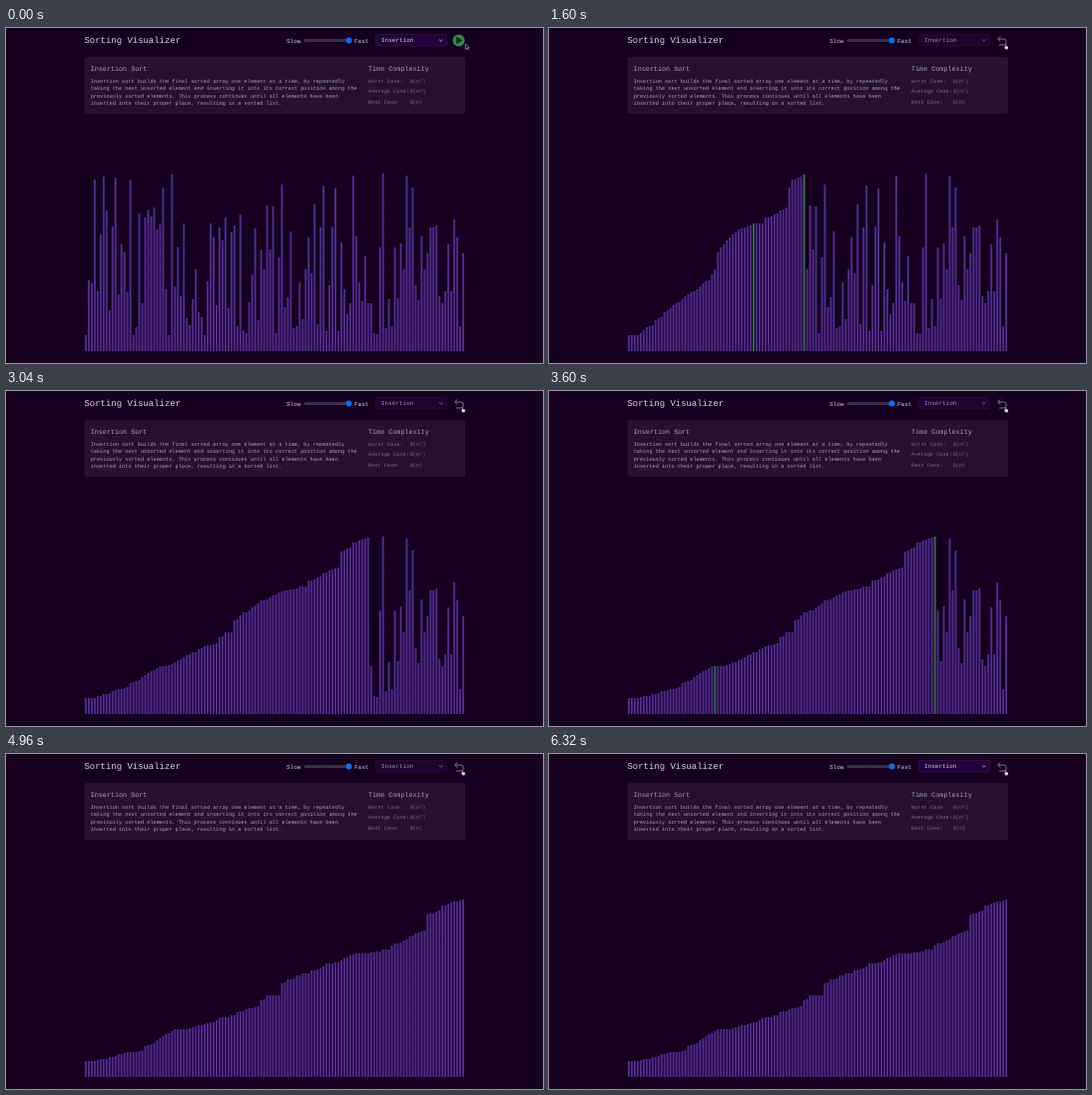
These frames come from a looping animation (538x336 px, 6400 ms). An HTML page with a canvas:

```html
<!DOCTYPE html>
<html lang="en">
<head>
<meta charset="utf-8">
<title>Sorting Visualizer</title>
<style>
html, body { margin: 0; width: 100%; height: 100%; overflow: hidden; background: #150020; }
canvas { display: block; width: 538px; height: 336px; }
</style>
</head>
<body>
<canvas id="stage" width="538" height="336"></canvas>
<script>
const ctx = document.getElementById('stage').getContext('2d');
const LOOP = 6400, TICK = 80;
const START = 560, SORTED = 4890, SWEEP = 4960, SWEEP_STEP = 4.5, FADE = 120, RESET = 6000;
const BASE = 324, LEFT = 79, PITCH = 2.977, BAR = 1.95;
const PURPLE = [80, 43, 143], GREEN = [54, 108, 74];

// Top edge of each bar before sorting.
const TOPS = [
  308, 253, 256, 152, 264, 207, 149, 183, 283, 199, 150, 267, 217, 225, 265, 152,
  308, 300, 186, 276, 190, 182, 189, 180, 202, 196, 160, 262, 308, 147, 259, 220,
  269, 196, 291, 298, 272, 242, 285, 290, 308, 254, 196, 210, 278, 200, 213, 190,
  281, 205, 198, 299, 187, 303, 306, 275, 247, 201, 293, 222, 242, 178, 222, 179,
  306, 230, 157, 280, 270, 204, 301, 299, 255, 292, 242, 210, 246, 177, 297, 200,
  158, 304, 258, 199, 161, 304, 215, 262, 287, 276, 148, 209, 255, 274, 229, 276,
  276, 306, 307, 220, 146, 301, 272, 299, 220, 271, 216, 242, 148, 200, 160, 258,
  273, 209, 242, 226, 200, 200, 198, 269, 276, 264, 217, 264, 192, 210, 299, 226
];

// Runs insertion sort for a number of steps; each shift is one step.
function insertionSort(limit) {
  const bars = TOPS.slice(), starts = [];
  let steps = 0;
  for (let i = 1; i < bars.length; i++) {
    const key = bars[i];
    let j = i;
    starts[i] = steps;
    while (j > 0 && bars[j - 1] < key) {
      if (steps >= limit) return { bars, active: j < i ? [i, j] : [] };
      bars[j] = bars[j - 1];
      j--;
      steps++;
    }
    bars[j] = key;
  }
  return { bars, active: [], starts, steps };
}

const full = insertionSort(Infinity);
const PACE = [
  [START, 0],
  [960, full.starts[37] + 16],
  [2240, full.starts[76] + 29],
  [3040, full.starts[96]],
  [4240, full.starts[118]],
  [SORTED, full.steps]
];

function stepsAt(t) {
  if (t <= START) return 0;
  for (let k = 1; k < PACE.length; k++) {
    const [t0, s0] = PACE[k - 1], [t1, s1] = PACE[k];
    if (t <= t1) return Math.round(s0 + (s1 - s0) * (t - t0) / (t1 - t0));
  }
  return full.steps;
}

const clamp = v => Math.max(0, Math.min(1, v));
const mix = (a, b, k) => `rgb(${a.map((v, i) => Math.round(v + (b[i] - v) * k))})`;

function text(str, x, y, size, color) {
  ctx.font = `${size}px "Liberation Mono", monospace`;
  ctx.fillStyle = color;
  ctx.fillText(str, x, y);
}

function box(x, y, w, h, r, fill, stroke) {
  ctx.beginPath();
  ctx.roundRect(x, y, w, h, r);
  ctx.fillStyle = fill;
  ctx.fill();
  if (stroke) {
    ctx.strokeStyle = stroke;
    ctx.lineWidth = 0.7;
    ctx.stroke();
  }
}

function disc(x, y, r, color) {
  ctx.beginPath();
  ctx.arc(x, y, r, 0, Math.PI * 2);
  ctx.fillStyle = color;
  ctx.fill();
}

function shape(points, fill, stroke, width = 0.6) {
  ctx.beginPath();
  points.forEach(([x, y]) => ctx.lineTo(x, y));
  ctx.lineWidth = width;
  if (fill) {
    ctx.closePath();
    ctx.fillStyle = fill;
    ctx.fill();
  }
  if (stroke) {
    ctx.strokeStyle = stroke;
    ctx.stroke();
  }
}

function drawBackground() {
  ctx.fillStyle = '#150020';
  ctx.fillRect(0, 0, 538, 336);
  ctx.fillStyle = 'rgba(255,255,255,0.045)';
  for (let y = 7; y < 336; y += 14.94)
    for (let x = 7; x < 538; x += 14.94) ctx.fillRect(x, y, 1, 1);
}

function drawHeader(t) {
  const busy = t >= START && t < RESET;
  text('Sorting Visualizer', 78.5, 15.3, 8.95, '#ddd5e4');
  text('Slow', 281, 14.5, 6, '#d0c7d8');
  text('Fast', 349, 14.5, 6, '#d0c7d8');
  box(298.5, 11, 47.5, 3, 1.5, '#3b3043');
  disc(343.5, 12.5, 3, '#0870f5');

  box(370.5, 6.5, 71, 11.5, 1.5, busy ? '#1c052f' : '#21043b', busy ? '#291139' : '#341550');
  text('Insertion', 376, 14.4, 6, busy ? '#9990a2' : '#d3cadb');
  shape([[434, 11.5], [435.7, 13.1], [437.4, 11.5]], null, busy ? '#8b8194' : '#c6bdcd', 0.8);
}

function drawButton(t) {
  if (t < START) {
    disc(453.5, 12.5, 6.1, '#328849');
    shape([[451.5, 9.2], [457, 12.5], [451.5, 15.8]], '#13231d', '#13231d');
    return;
  }
  ctx.beginPath();
  ctx.moveTo(450, 11);
  ctx.lineTo(455.3, 11);
  ctx.arc(455.3, 14, 3, -Math.PI / 2, Math.PI / 2);
  ctx.lineTo(451, 17);
  ctx.strokeStyle = '#8b8095';
  ctx.lineWidth = 0.9;
  ctx.stroke();
  shape([[452.3, 8.4], [449.6, 11], [452.3, 13.6]], null, '#8b8095', 0.9);
}

function drawCursor(t) {
  if (t < 240) {
    shape([[460.3, 15.8], [460.3, 21.2], [461.6, 20], [462.6, 22], [463.4, 21.6],
      [462.5, 19.7], [464, 19.5]], '#08030c', '#d8d2dd', 0.55);
  } else {
    shape([[456.8, 16.3], [457.6, 16.3], [457.8, 18], [460, 18.6], [460, 20.2],
      [459.2, 21.4], [457.3, 21.4], [455.8, 19.3], [456.8, 19.3]], '#e4dfe7', '#241b2a', 0.3);
  }
}

function drawPanel() {
  const soft = '#aaa0b0', dim = '#776b7f';
  box(78.5, 29, 381.5, 57, 2, '#25122f');
  text('Insertion Sort', 84.7, 43.4, 6.75, soft);
  [
    'Insertion sort builds the final sorted array one element at a time, by repeatedly',
    'taking the next unsorted element and inserting it into its correct position among the',
    'previously sorted elements. This process continues until all elements have been',
    'inserted into their proper place, resulting in a sorted list.'
  ].forEach((line, i) => text(line, 84.7, 54.8 + i * 7.45, 5.24, soft));

  text('Time Complexity', 363, 43.4, 6.75, soft);
  [['Worst Case:', 'O(n²)'], ['Average Case:', 'O(n²)'], ['Best Case:', 'O(n)']]
    .forEach(([label, cost], i) => {
      text(label, 363, 54.8 + i * 10.5, 5.24, dim);
      text(cost, 404.7, 54.8 + i * 10.5, 5.24, dim);
    });
}

function drawBars(t) {
  const { bars, active } = insertionSort(stepsAt(t));
  bars.forEach((top, i) => {
    let green = active.includes(i) ? 1 : 0;
    if (t >= SWEEP && t < RESET) green = clamp((t - SWEEP - i * SWEEP_STEP) / FADE);
    ctx.fillStyle = mix(PURPLE, GREEN, green);
    ctx.fillRect(LEFT + i * PITCH, top, BAR, BASE - top);
  });
}

function draw(now) {
  const t = Math.floor((now % LOOP) / TICK) * TICK;
  drawBackground();
  drawPanel();
  drawBars(t);
  drawHeader(t);
  drawButton(t);
  drawCursor(t);
}

ctx.textRendering = 'geometricPrecision';
let origin = null;
function frame(now) {
  if (origin === null) origin = now;
  draw(Math.max(0, now - origin));
  requestAnimationFrame(frame);
}
draw(0);
requestAnimationFrame(frame);
</script>
</body>
</html>
```
